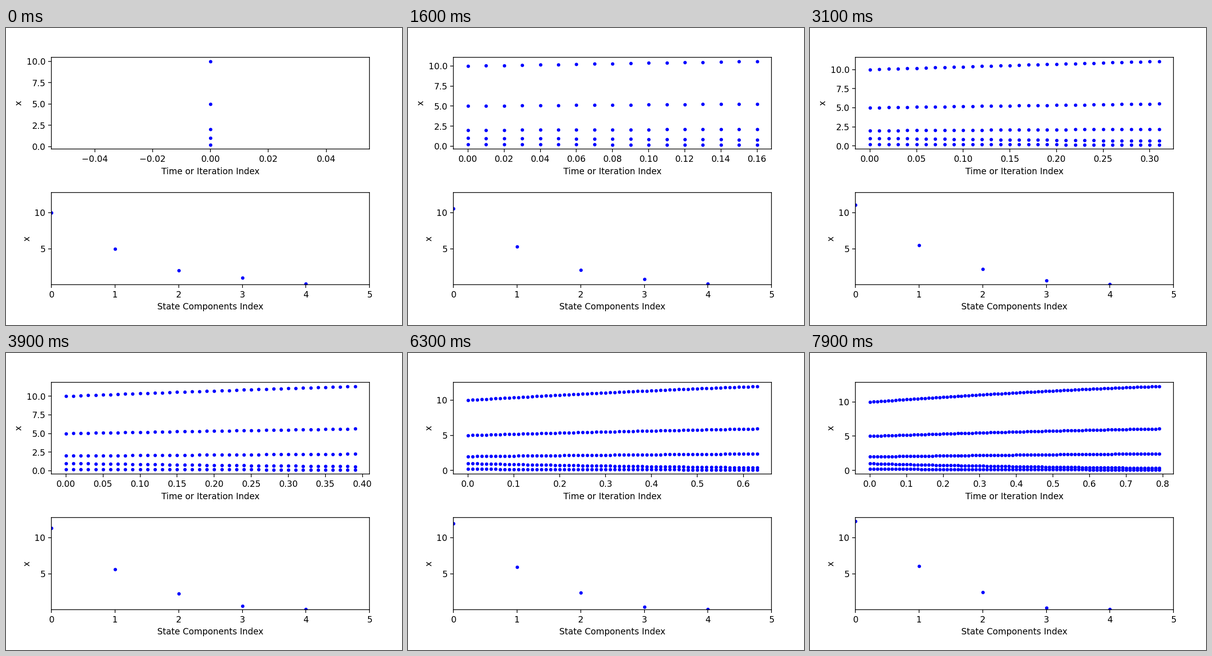
A matplotlib script that plays this animation: 864x648 px, repeating every 8000 ms.

```python
import numpy as np
import matplotlib.pyplot as plt
from matplotlib.animation import FuncAnimation

STEPS = 80
DT = 0.01
START = np.array([10, 5, 2, 1, 0.2])

# Three components grow and level off, two decay.
t = np.arange(STEPS) * DT
growth = 0.3735 * t - 0.1435 * t**2
exponents = np.column_stack(
    [growth, 0.95 * growth, 0.95 * growth, -1.42 * t, -1.05 * t])
states = START * np.exp(exponents)

fig, (history, current) = plt.subplots(2, 1, figsize=(6.4, 4.8), dpi=135)
fig.subplots_adjust(left=0.115, right=0.918, top=0.9017, bottom=0.1363,
                    hspace=0.4775)

trails = history.plot(np.zeros((1, 5)), states[:1], "b.")
history.set(xlabel="Time or Iteration Index", ylabel="x")

dots, = current.plot(np.arange(5), states[0], "b.")
current.set(xlim=(0, 5), ylim=(0.076, 12.73),
            xlabel="State Components Index", ylabel="x")


def update(i):
    for trail, values in zip(trails, states.T):
        trail.set_data(t[:i + 1], values[:i + 1])
    history.relim()
    history.autoscale_view()
    dots.set_ydata(states[i])
    return [*trails, dots]


anim = FuncAnimation(fig, update, frames=STEPS, interval=100,
                     repeat=True, repeat_delay=0, blit=False)
plt.show()
```
